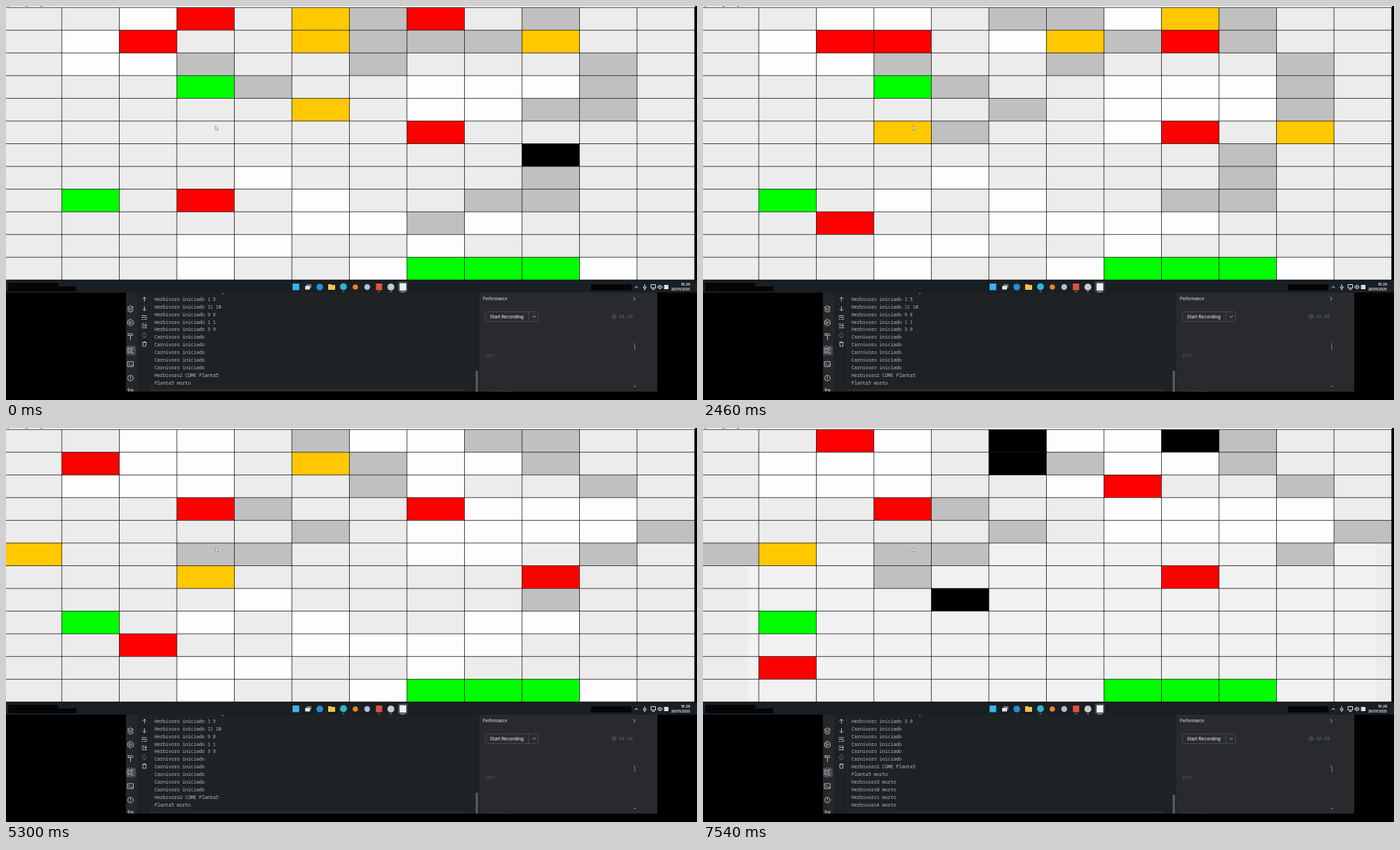
An HTML page that plays this animation: 991 by 565 pixels, repeating every 8000 ms.

```html
<!DOCTYPE html>
<html lang="pt">
<head>
<meta charset="utf-8">
<title>Grid simulation</title>
<style>
  html, body { margin: 0; width: 100%; height: 100%; overflow: hidden; background: #000; }
  svg { display: block; width: 991px; height: 565px; }
  .ui { font-family: Inter, Roboto, sans-serif; }
  .mono { font-family: "Noto Sans Mono", "DejaVu Sans Mono", monospace; font-size: 6.67px; white-space: pre; }
  .ico { fill: none; stroke: #b4b8bc; stroke-width: 1; stroke-linecap: round; stroke-linejoin: round; }
  .dim { stroke: #505458; }
</style>
</head>
<body>
<svg viewBox="0 0 991 565">
  <defs>
    <clipPath id="consoleClip"><rect x="208" y="412" width="466" height="136"/></clipPath>
    <clipPath id="panelClip"><rect x="172" y="411" width="762" height="142"/></clipPath>
  </defs>
  <rect width="991" height="565"/>

  <!-- simulation window -->
  <rect width="988" height="393" fill="#ececec"/>
  <rect width="988" height="2" fill="#fafafa"/>
  <path d="M2 .5h2M28 .5h3M49 .5h3" stroke="#777"/>
  <g id="cells"></g>
  <path id="lines" fill="none" stroke="#000" stroke-opacity=".74"/>
  <path d="M300.3 171.5v6.3l1.5-1.3 1 2.1 1-.5-1-2h1.7z" fill="#fff" stroke="#777" stroke-width=".7"/>

  <!-- taskbar -->
  <rect y="393.5" width="991" height="17.5" fill="#1a1f23"/>
  <path d="M3 397h72v12H3zM75 402h26v7H75zM839 399h58v9H839z" fill="#050607"/>
  <rect x="411" y="398" width="9.5" height="9.5" fill="#35b6f2"/>
  <path d="M431 399h7v5h-7z" fill="#777"/>
  <path d="M429 401.5h7v5h-7z" fill="#e8e8e8"/>
  <circle cx="450" cy="403" r="4.8" fill="#2390d8"/>
  <path d="M462 399h4l1 1h5v7h-10z" fill="#f5c542"/>
  <circle cx="484" cy="402.5" r="5" fill="#2cb5cf"/>
  <circle cx="501" cy="403" r="3.8" fill="#e8842c"/>
  <circle cx="518" cy="403" r="4.2" fill="#a9c2d2"/>
  <rect x="530.5" y="398" width="9" height="9.5" fill="#e2513f"/>
  <circle cx="552" cy="403" r="5" fill="#c9c9c9"/>
  <rect x="562" y="395" width="14" height="15" rx="2" fill="#3c454c"/>
  <rect x="564.5" y="397.5" width="9.5" height="10.5" fill="#eef0f2"/>
  <path d="M482.5 409.8h3M533.5 409.8h3M550.5 409.8h3" stroke="#8d9499"/>
  <path d="M565.5 410h7" stroke="#4cb4ee" stroke-width="1.4"/>
  <g class="ico" style="stroke:#eee">
    <path d="M902 404l2-2 2 2M916 399.5v4M914 402.5q0 3 2 3t2-3M916 405.5v1.5"/>
    <path d="M925.5 399.5h6v5h-6zM927 406.5h3M935 402v2h1l2 2v-6l-2 2zM940 401q1.5 2 0 4"/>
    <path d="M944.5 400.5h5v5h-5z" fill="#ddd"/>
  </g>
  <g class="ui" fill="#fff" font-size="4.8" font-weight="600" text-anchor="end">
    <text x="981" y="401.3">16:29</text>
    <text x="981" y="408">26/01/2025</text>
  </g>

  <!-- tool window -->
  <g clip-path="url(#panelClip)">
    <rect x="172" y="411" width="762" height="142" fill="#1e2225"/>
    <rect x="172" y="411" width="16" height="142" fill="#25282b"/>
    <path d="M207.5 411v142" stroke="#25292c"/>
    <rect x="172" y="487" width="14" height="14" rx="3" fill="#484c50"/>
    <g class="ico">
      <path d="M174.5 432l4-2 4 2-4 2zM174.5 434.5l4 2 4-2M174.5 437l4 2 4-2"/>
      <path d="M178.5 449.5l4 2.3v4.6l-4 2.3-4-2.3v-4.6zM177.3 452l3.2 2-3.2 2z"/>
      <path d="M175 470h6l1.5 2M175 470v2.5h6M178.5 473v5.5"/>
      <path d="M175 490.5v7l6-3.5zM179 490.5h3.5M179 497.5h3.5"/>
      <path d="M174.5 510h8v7h-8zM176.3 512l1.5 1.5-1.5 1.5M179 515h2"/>
      <circle cx="178.5" cy="533.5" r="4"/>
      <path d="M178.5 531.3v2.5M178.5 535.6v.1"/>
      <circle cx="176.3" cy="550" r="1.4"/><circle cx="180.8" cy="551" r="1.4"/>
      <path d="M176.3 551.5v3"/>
      <path d="M198.5 423.5v-6M196 420l2.5-2.5 2.5 2.5M198.5 431v6M196 434.5l2.5 2.5 2.5-2.5"/>
      <path d="M195 444h7M195 446.5h5.5q1.5 0 1.5 1.5t-1.5 1.5h-2M195 449.5h1.5"/>
      <path d="M195 456h3M195 458.5h3M195 461.5h7M200.5 455.5v4M199 458l1.5 1.5 1.5-1.5"/>
      <path class="dim" d="M196 470.5h5v3.5h-5zM197 468.5h3M197 475.5h3"/>
      <path d="M195.5 482.5h6M197.5 481.5h2M196.3 482.5v5.5h4.4v-5.5"/>
    </g>
    <g clip-path="url(#consoleClip)">
      <g id="log" class="mono" fill="#b9bec2"></g>
    </g>
    <path d="M310 412.2h2" stroke="#a0a4a8"/>
    <path d="M208 550.5h452" stroke="#2b3034" stroke-width="2"/>
    <rect id="thumb" x="673.5" y="523" width="3.5" height="30" fill="#54595d"/>

    <rect x="678" y="411" width="256" height="142" fill="#282a2d"/>
    <path d="M678.5 411v142" stroke="#1f2123"/>
    <g class="ui">
      <text x="684" y="422.4" font-size="5.6" font-weight="500" fill="#d6d8da">Performance</text>
      <rect x="687.5" y="438.5" width="76" height="14" rx="2" fill="#292b2f" stroke="#45494d"/>
      <path d="M749.5 439v13" stroke="#45494d"/>
      <text x="694" y="448" font-size="6.5" font-weight="500" fill="#dfe1e3">Start Recording</text>
      <text x="687" y="503.8" font-size="6.6" fill="#55595d">CPU</text>
      <text x="687" y="556" font-size="6.6" fill="#4b4f53">Live Memory</text>
    </g>
    <g class="ico">
      <path d="M900 417.8l2.2 2.2-2.2 2.2M755.5 444.5l2 2 2-2"/>
      <g class="dim"><circle cx="872" cy="445.5" r="3"/><path d="M870.8 444.2h2.4v2.6h-2.4z"/></g>
      <path d="M900.5 483.5q1.3 0 1.5 9.5" style="stroke:#85898d"/>
      <path d="M900.5 545.5h2.5" style="stroke:#85898d"/>
    </g>
    <text x="879" y="448" class="mono" fill="#5c6064">00:00</text>
  </g>
</svg>
<script>
const NS = 'http://www.w3.org/2000/svg';
const LOOP = 8000, N = 12, ROW_H = 32.55, LINE_H = 10.92;
const COLORS = {
  '.': '#ececec', w: '#fdfdfd', g: '#c0c0c0', r: '#ff0000',
  y: '#ffc800', l: '#00ff00', k: '#000000'
};
const START = [
  '..wr.ygr.g..', '.wr..ygggy..', '.wwg..g...g.', '...lg..wwwg.',
  '.....y.wwgg.', '.......r....', '.........k..', '....w....g..',
  '.l.r.w..gg..', '.....wwgw...', '...ww..w....', '...w..wlllw.'
];
// Each move is row, column (base 12) and the new state.
const MOVES = [
  [540, '45g 54y'],
  [660, '83w 92r 57w 58r 97w'],
  [820, '03w 13r 07w 18r 05g 15g 16w 19g 09y'],
  [940, '49w 5ay 69g'],
  [2460, '54g 53y 08y 09g 15w 16y'],
  [2600, '13w 23r 18w 27r 12w 11r 5ag 4aw 4by 92w 88w'],
  [2870, 'a3r'],
  [4520, '53g 63y 08g 16g 15y 4bg 50y'],
  [4640, '23w 33r 27w 37r 58w 69r 06w 17w 3aw 89w'],
  [4900, 'a3w 92r'],
  [6370, '11w 02r 37w 27r 26w 50g 51y 69w 68r 63g 92w a1r 79w'],
  [6490, '05k 15k 08k 74k']
];
const END_TIME = 7300;
const LOG = [
  ...['1 5', '11 10', '9 8', '1 1', '3 9'].map(p => 'Herbivoro iniciado ' + p),
  ...Array(5).fill('Carnivoro iniciado'),
  'Herbivoro2 COME Planta5', 'Planta5 morto',
  ...[3, 0, 1, 4].map(n => `Herbivoro${n} morto`)
];

const byId = id => document.getElementById(id);
const colX = c => c ? Math.min(988, 80 + 82.5 * (c - 1)) : 0;
const rowY = r => 2.2 + ROW_H * r;

function add(parent, tag, attrs) {
  const el = document.createElementNS(NS, tag);
  for (const key in attrs) el.setAttribute(key, attrs[key]);
  return byId(parent).appendChild(el);
}

function box(x, y, right) {
  return add('cells', 'rect', { x, y, width: right - x, height: ROW_H });
}

const cells = [];
for (let r = 0; r < N; r++)
  for (let c = 0; c < N; c++) cells.push(box(colX(c), rowY(r), colX(c + 1)));

// The outer margins keep their shade when the lower rows brighten.
const margins = [];
for (let r = 5; r < N; r++) {
  if (r !== 5) margins.push(box(0, rowY(r), 64));
  margins.push(box(966, rowY(r), 988));
}
margins.forEach(m => m.setAttribute('fill', COLORS['.']));

let d = '';
for (let i = 0; i <= N; i++) {
  d += `M0 ${rowY(i)}H988`;
  if (i) d += `M${colX(i)} 2V393`;
}
byId('lines').setAttribute('d', d);

LOG.forEach((line, i) => {
  add('log', 'text', { x: 213, y: 422.8 + i * LINE_H }).textContent = line;
});

function draw(t) {
  const state = [...START.join('')];
  for (const [time, list] of MOVES) {
    if (t < time) break;
    for (const m of list.split(' ')) state[parseInt(m.slice(0, 2), 12)] = m[2];
  }
  const ended = t >= END_TIME;
  state.forEach((s, i) => {
    const bright = ended && i >= 5 * N && (s === '.' || s === 'w');
    cells[i].setAttribute('fill', bright ? '#f1f1f1' : COLORS[s]);
  });
  byId('log').setAttribute('transform', `translate(0 ${ended ? -4 * LINE_H : 0})`);
  byId('thumb').setAttribute('y', ended ? 526 : 523);
}

const begin = performance.now();
let shown = -1;
function tick() {
  const t = (performance.now() - begin) % LOOP;
  const step = MOVES.filter(m => t >= m[0]).length + (t >= END_TIME);
  if (step !== shown) draw(t);
  shown = step;
  requestAnimationFrame(tick);
}
tick();
</script>
</body>
</html>
```
